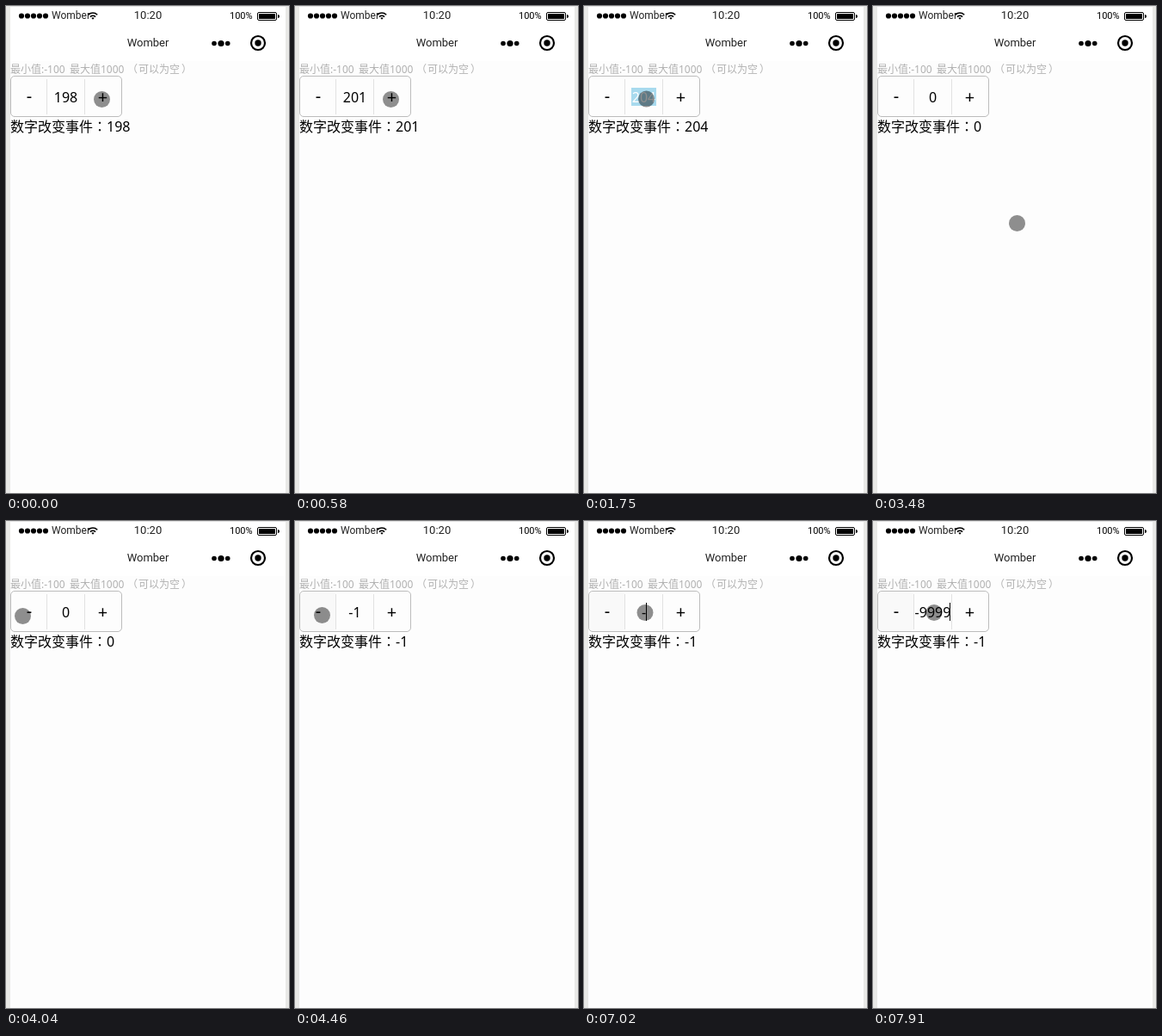
Animation, 329 px wide and 566 px high, one loop 8000 ms. Source, as an HTML page:

```html
<!DOCTYPE html>
<html lang="zh-CN">
<head>
<meta charset="utf-8">
<title>Number stepper</title>
<style>
  html, body { margin: 0; width: 100%; height: 100%; overflow: hidden; background: #e8e8e6; }
  svg { display: block; width: 329px; height: 566px; }
  text { font: 16px "Noto Sans", "Noto Sans CJK SC", sans-serif; white-space: pre; }
  .bar text { font: 12px Roboto, sans-serif; fill: #222; }
  .bar .big { font-size: 13px; }
  .bar .small { font-size: 11px; fill: #000; }
  .hint text { font-size: 12px; fill: #b0b0b0; }
  .hint .wide, .wide { font-family: "Noto Sans CJK JP", "Noto Sans CJK SC", sans-serif; }
  .sign { font-size: 20px; }
  .mid { text-anchor: middle; }
</style>
</head>
<body>
<svg viewBox="0 0 329 566">
  <rect x="5" width="320" height="566" fill="#fff"/>
  <rect x="5" y="64" width="320" height="502" fill="#fdfdfd"/>
  <rect width="329" height="1" fill="#e4e4e4"/>

  <g class="bar">
    <path d="M18 11.5h28.1" stroke="#000" stroke-width="6.2" stroke-linecap="round" stroke-dasharray="0 7"/>
    <text x="53" y="15">Womber</text>
    <g fill="none" stroke="#000" stroke-width="1.6">
      <path d="M95.8 10.2a7.4 7.4 0 0 1 10.4 0M98 12.6a4.3 4.3 0 0 1 6 0"/>
      <path d="M99.4 13.9a2.3 2.3 0 0 1 3.2 0L101 15.8z" fill="#000" stroke="none"/>
    </g>
    <text class="big mid" x="165" y="15">10:20</text>
    <text class="small" x="260" y="15">100%</text>
    <rect x="292.5" y="7.5" width="22" height="9" rx="1.5" fill="none" stroke="#000"/>
    <rect x="294" y="9" width="19" height="6" rx=".5"/>
    <path d="M316 10a2 2 0 0 1 0 4z"/>
    <text class="big mid" x="165" y="47">Womber</text>
    <circle cx="242" cy="43.5" r="2.8"/>
    <circle cx="250" cy="43.5" r="3.6"/>
    <circle cx="257.7" cy="43.5" r="2.8"/>
    <circle cx="293" cy="43" r="8" fill="none" stroke="#000" stroke-width="2.2"/>
    <circle cx="293" cy="43" r="3.7"/>
  </g>

  <g class="hint">
    <text x="5" y="78">最小值:-100</text>
    <text x="74" y="78">最大值1000</text>
    <text class="wide" x="141" y="78">（</text>
    <text x="154" y="78">可以为空</text>
    <text class="wide" x="204" y="78">）</text>
  </g>

  <rect id="press" x="6" y="82" width="41" height="46" rx="4" fill="#f9f9f9"/>
  <rect x="5.5" y="81.5" width="129" height="47" rx="4.5" fill="none" stroke="#bcbcbc"/>
  <path d="M47.5 85v41M91.5 85v41" stroke="#e2e2e2"/>
  <text class="sign mid" x="27" y="112">-</text>
  <text class="sign mid" x="112.5" y="113">+</text>
  <rect id="select" y="95" height="21" fill="#a8daee"/>
  <text id="value" class="mid" x="69.5" y="112"></text>
  <rect id="caret" y="95" width="1" height="21"/>

  <text x="5" y="146">数字改变事件</text>
  <text class="wide" x="101" y="146">：</text>
  <text id="result" x="117" y="146"></text>
  <circle id="touch" r="9.5" fill="#000" fill-opacity=".44"/>
</svg>
<script>
const LOOP = 8000, MID = 69.5;
const CLEAR = 2900, ZERO = 3180, BLUR = 3330, MINUS = 4190, FOCUS = 5070, RETYPE = 7020;
const [press, select, value, caret, result, touch] =
  ['press', 'select', 'value', 'caret', 'result', 'touch'].map(id => document.getElementById(id));

// The pointer starts on the plus button and moves in visible steps.
const start = { x: 111.5, y: 108.5 };
const moves = [
  { from: 1030, to: 1510, steps: 4, ease: 1, x: 72.5, y: 108 },
  { from: 3180, to: 3480, steps: 2, ease: 3.3, x: 167.5, y: 252.5 },
  { from: 3480, to: 4040, steps: 4, ease: 1.4, x: 19.5, y: 110.5 },
  { from: 4040, to: 4190, steps: 1, ease: 1, x: 31.5, y: 109.5 },
  { from: 4460, to: 4820, steps: 3, ease: 1, x: 71, y: 106.5 }
];

const clamp = (v, lo, hi) => Math.min(hi, Math.max(lo, v));

function pointer(t) {
  return moves.reduce((p, m) => {
    const part = clamp((t - m.from) / (m.to - m.from), 0, 1);
    const k = 1 - (1 - Math.floor(part * m.steps + 1e-6) / m.steps) ** m.ease;
    return { x: p.x + (m.x - p.x) * k, y: p.y + (m.y - p.y) * k };
  }, start);
}

// Two bursts of taps on plus, 150 ms apart.
function counted(t) {
  const taps = t < 580 ? Math.min(2, Math.floor(t / 150)) : Math.min(6, 3 + Math.floor((t - 580) / 150));
  return String(198 + taps);
}

// A minus sign, then nines struck in quick pairs.
function typed(t) {
  const since = t - 7420;
  const nines = since < 0 ? 0 : 1 + 2 * Math.floor(since / 370) + (since % 370 >= 120);
  return '-' + '9'.repeat(nines);
}

function inputText(t) {
  if (t < CLEAR) return counted(t);
  if (t < ZERO) return '';
  if (t < MINUS) return '0';
  return t < RETYPE ? '-1' : typed(t);
}

function resultText(t) {
  if (t < 3480) return counted(t);
  return t < MINUS ? '0' : '-1';
}

// Selected characters, counted from the end.
function selected(t) {
  if (t >= 1750 && t < CLEAR) return 3;
  return t < RETYPE ? clamp(Math.floor((t - FOCUS) / 150), 0, 2) : 0;
}

const width = s => [...s].reduce((w, c) => w + (c === '-' ? 5.15 : 9.15), 0);
const setText = (node, s) => { if (node.textContent !== s) node.textContent = s; };
const set = (node, attrs) => {
  for (const key in attrs) node.setAttribute(key, attrs[key]);
};
const show = (node, on) => set(node, { visibility: on ? 'visible' : 'hidden' });

function draw(t) {
  const text = inputText(t), count = selected(t), { x, y } = pointer(t);
  const right = MID + width(text) / 2;
  setText(value, text);
  setText(result, resultText(t));
  set(value, { fill: count && count === text.length ? '#fff' : '#000' });

  const left = Math.floor(right - width(text.slice(text.length - count)));
  set(select, { x: left, width: count ? Math.ceil(right) - left : 0 });

  const focusing = t >= FOCUS && t < FOCUS + 150;
  const caretX = focusing ? right - width('1') : right;
  set(caret, { x: Math.min(89, Math.round(caretX)) });
  show(caret, focusing || (t >= CLEAR && t < BLUR) || t >= RETYPE);

  show(press, t >= MINUS);
  set(touch, { cx: x, cy: y });
}

const origin = performance.now();
function tick() {
  draw((performance.now() - origin) % LOOP);
  requestAnimationFrame(tick);
}
tick();
</script>
</body>
</html>
```
